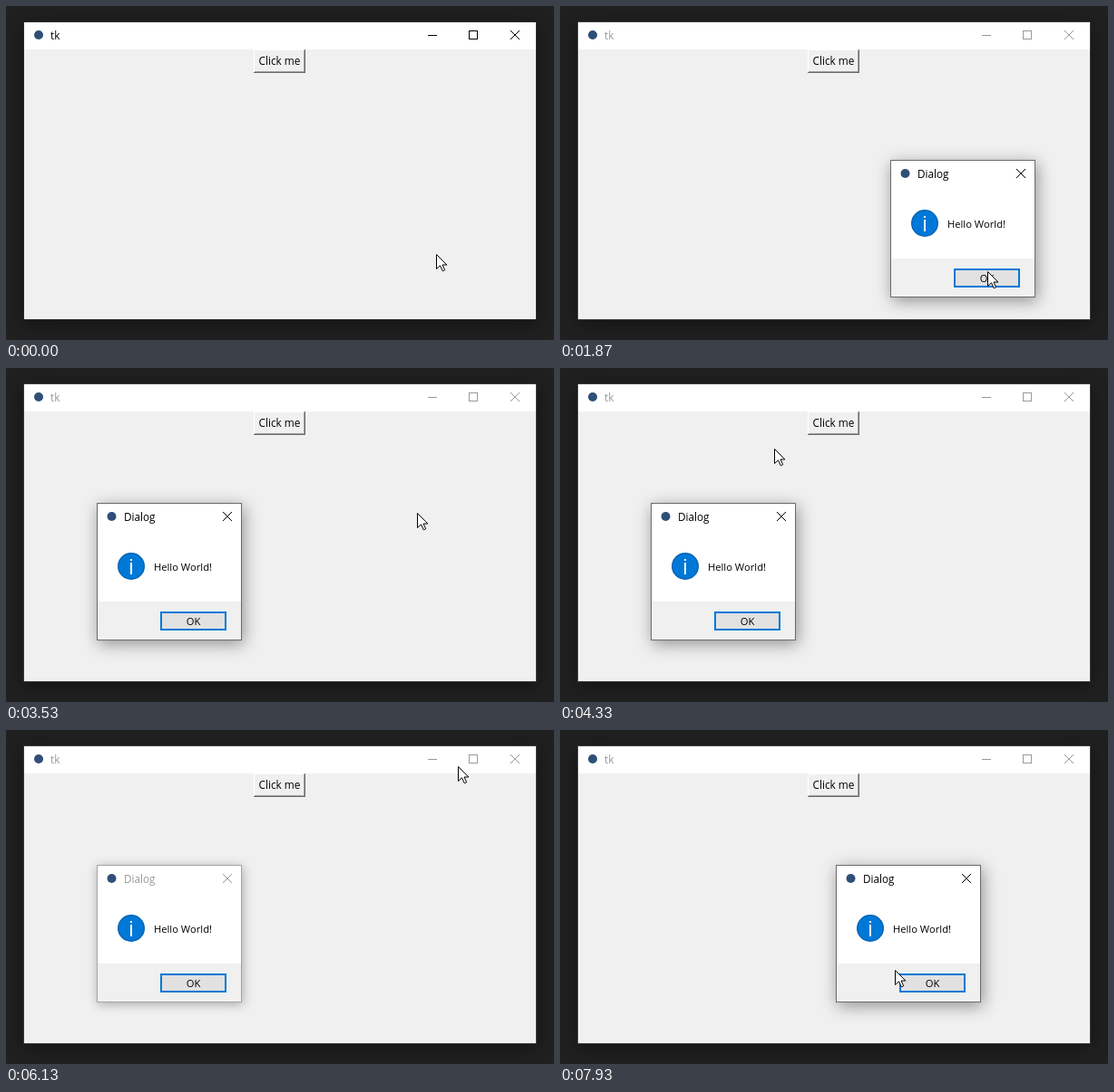
An HTML page with a canvas for the animation above (8000 ms loop, 604 px wide and 369 px high).

```html
<!DOCTYPE html>
<html lang="en">
<head>
<meta charset="utf-8">
<title>Dialog demo</title>
<style>
html, body { margin: 0; width: 100%; height: 100%; overflow: hidden; background: #202020; }
canvas { display: block; }
</style>
</head>
<body>
<canvas id="stage" width="604" height="369"></canvas>
<script>
const ctx = document.getElementById('stage').getContext('2d');
const LOOP = 8000, TICKS = 120, TICK = LOOP / TICKS;
const PRESS = 12, OPEN = 15;

// Pointer moves: start tick, end tick, destination. It rests in between.
const moves = [
  [4, 11, 308, 60], [15, 27, 471, 293],                      // button, then OK
  [30, 35, 410, 189], [37, 43, 183, 170], [43, 46, 146, 168], // first drag
  [47, 52, 453, 160], [61, 65, 236, 89], [65, 67, 150, 62],
  [73, 74, 123, 33], [84, 91, 498, 40],                      // clicks outside
  [98, 105, 151, 187], [105, 108, 159, 162],
  [110.5, 113, 363, 162], [114, 119, 369, 265]               // second drag
];
const drags = [[37, 46], [110, 113]];
const clicksOutside = [55, 67, 74, 79, 92, 103];

const clamp = (v, lo, hi) => Math.max(lo, Math.min(hi, v));

function pointerAt(tick) {
  let x = 474, y = 274;
  for (const [from, to, tx, ty] of moves) {
    const p = clamp((tick - from) / (to - from), 0, 1), e = p * p * (3 - 2 * p);
    x += (tx - x) * e;
    y += (ty - y) * e;
  }
  return [Math.round(x), Math.round(y)];
}

// The dialog follows the pointer while it is dragged.
function dialogAt(tick) {
  let x = 364, y = 170;
  for (const [from, to] of drags) {
    const a = pointerAt(from), b = pointerAt(clamp(tick, from, to));
    x += b[0] - a[0];
    y += b[1] - a[1];
  }
  return [x, y];
}

// A click outside the modal dialog makes its frame blink twice.
const blinks = tick => clicksOutside.some(c => tick === c || tick === c + 2);

function rect(x, y, w, h, color) {
  ctx.fillStyle = color;
  ctx.fillRect(x, y, w, h);
}

function text(str, x, y, color = '#000', size = 11.7, align = 'left') {
  ctx.font = `500 ${size}px "Open Sans", "Noto Sans", sans-serif`;
  ctx.textAlign = align;
  ctx.fillStyle = color;
  ctx.fillText(str, x, y);
}

function disc(x, y, r, color) {
  ctx.fillStyle = color;
  ctx.beginPath();
  ctx.arc(x, y, r, 0, 7);
  ctx.fill();
}

function cross(x, y, color) {
  ctx.strokeStyle = color;
  ctx.lineWidth = 1;
  ctx.beginPath();
  ctx.moveTo(x, y);
  ctx.lineTo(x + 10, y + 10);
  ctx.moveTo(x + 10, y);
  ctx.lineTo(x, y + 10);
  ctx.stroke();
}

function shadowed(x, y, w, h, color, blur, dx, dy, alpha) {
  ctx.save();
  ctx.shadowColor = `rgba(0,0,0,${alpha})`;
  ctx.shadowBlur = blur;
  ctx.shadowOffsetX = dx;
  ctx.shadowOffsetY = dy;
  rect(x, y, w, h, color);
  ctx.restore();
}

function drawButton(down) {
  const [outer, lit, inner, soft] = down
    ? ['#fff', '#696969', '#e3e3e3', '#a0a0a0']
    : ['#696969', '#fff', '#a0a0a0', '#f0f0f0'];
  rect(273, 48, 57, 26, outer);
  rect(273, 48, 56, 25, lit);
  rect(274, 49, 55, 24, inner);
  rect(274, 49, 54, 23, soft);
  rect(275, 50, 53, 22, '#f0f0f0');
  const d = down ? 1 : 0;
  text('Click me', 301.5 + d, 65 + d, '#000', 11.8, 'center');
}

function drawWindow(active, down) {
  rect(0, 0, 604, 369, '#202020');
  shadowed(19, 17, 566, 330, active ? '#2a2a2a' : '#3c3c3c', 20, 0, 4, 0.4);
  rect(20, 18, 564, 328, '#f0f0f0');
  rect(20, 18, 564, 30, '#fff');
  const ink = active ? '#000' : '#999';
  disc(36, 32, 5, '#2f4f77');
  text('tk', 49, 37, ink);
  rect(465, 32, 10, 1, ink);
  ctx.strokeStyle = ink;
  ctx.lineWidth = 1;
  ctx.strokeRect(510.5, 27.5, 9, 9);
  cross(556, 27, ink);
  drawButton(down);
}

function drawDialog([x, y], active, alpha) {
  ctx.save();
  ctx.globalAlpha = alpha;
  ctx.translate(x, y);
  if (active) shadowed(0, 0, 160, 152, '#6b6b6b', 17, 2, 4, 0.4);
  else shadowed(0, 0, 160, 152, '#a5a5a5', 11, 1, 2, 0.3);
  rect(1, 1, 158, 150, '#fff');
  rect(1, 109, 158, 42, '#f0f0f0');
  const ink = active ? '#000' : '#999';
  disc(16.5, 15, 5, '#2f4f77');
  text('Dialog', 30, 20, ink);
  cross(139, 10, ink);
  disc(38, 70, 15, '#005fae');
  disc(38, 70, 13.8, '#0078d7');
  rect(37, 62, 2, 2, '#fff');
  rect(37, 66, 2, 13, '#fff');
  text('Hello World!', 63, 75, '#000', 11.2);
  rect(70, 120, 73, 21, '#0078d7');
  rect(72, 122, 69, 17, '#e1e1e1');
  text('OK', 106.5, 135, '#000', 11.2, 'center');
  ctx.restore();
}

const arrow = new Path2D('M.5 .5v16l4-3.7 2.8 6 2.4-1.1-2.7-5.7h4.9z');

function drawPointer([x, y]) {
  ctx.save();
  ctx.translate(x, y);
  ctx.fillStyle = '#fff';
  ctx.fill(arrow);
  ctx.strokeStyle = '#000';
  ctx.lineWidth = 1;
  ctx.stroke(arrow);
  ctx.restore();
}

function draw(ms) {
  const tick = Math.floor((ms + 3.4) / TICK) % TICKS;
  drawWindow(tick < OPEN, tick >= PRESS && tick < PRESS + 2);
  if (tick >= OPEN) {
    drawDialog(dialogAt(tick), !blinks(tick), Math.min(1, (tick - OPEN + 1) / 4));
  }
  drawPointer(pointerAt(tick));
}

const start = performance.now();
function loop(now) {
  draw(Math.max(0, now - start) % LOOP);
  requestAnimationFrame(loop);
}
requestAnimationFrame(loop);
</script>
</body>
</html>
```
